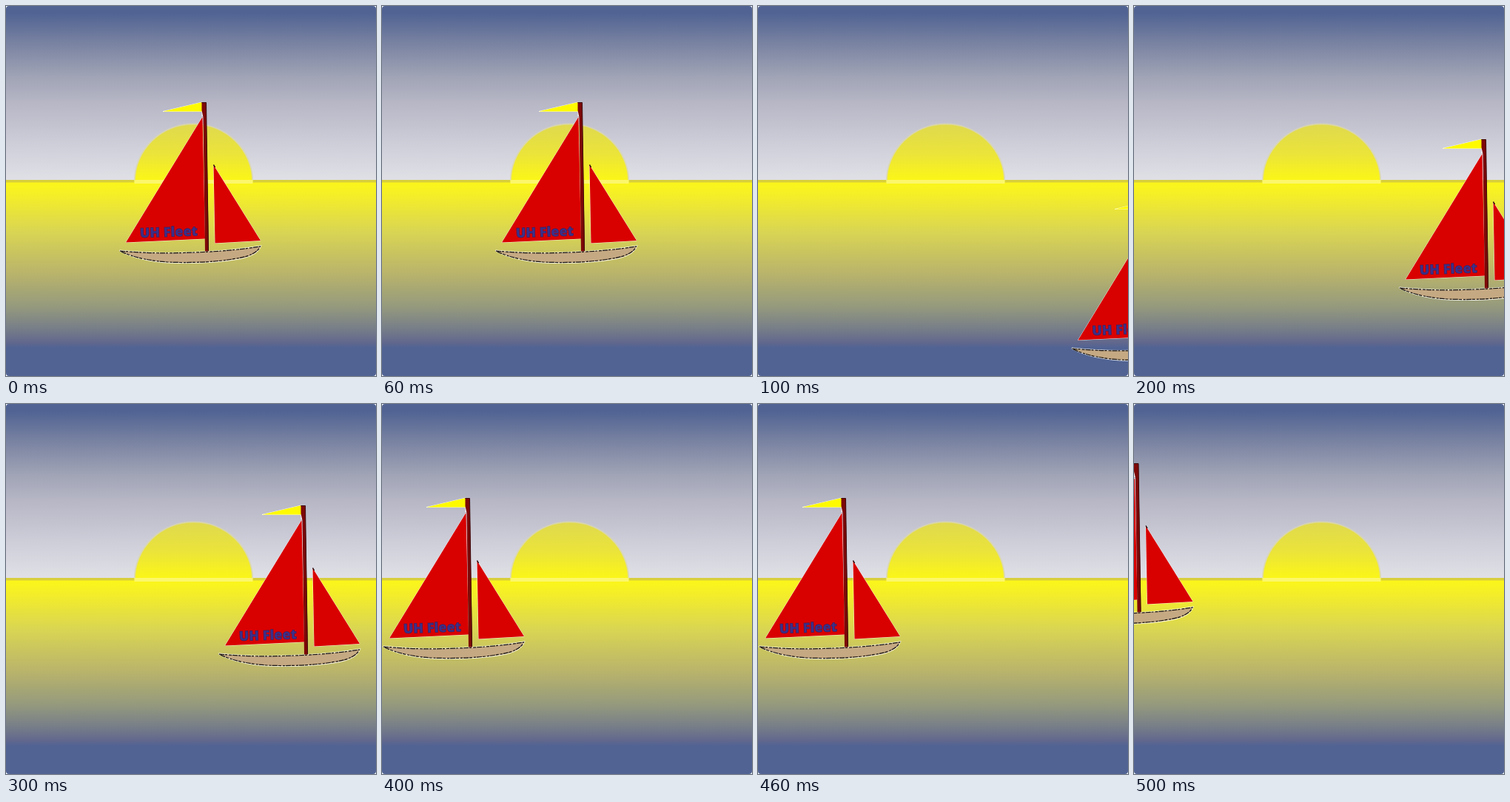
Write an HTML page that moves like this. It is 500x500 px and loops after 0.6 s.

```html
<!DOCTYPE html>
<html lang="en">
<head>
<meta charset="utf-8">
<title>Sailing boat at sunset</title>
<style>
  html, body { margin: 0; width: 100%; height: 100%; overflow: hidden; background: #fff; }
  svg { display: block; width: 100vw; height: 100vh; }
  text { font: 800 18px "Open Sans", sans-serif; fill: #3c2f8c; stroke: #3a2460; stroke-width: .7; }
  .cloth { stroke: #fff; stroke-opacity: .8; paint-order: stroke; }
</style>
</head>
<body>
<svg viewBox="0 0 500 500">
  <defs>
    <linearGradient id="sky" gradientUnits="userSpaceOnUse" x1="0" y1="0" x2="0" y2="236">
      <stop offset=".04" stop-color="#506393"/>
      <stop offset=".2" stop-color="#7680a0"/>
      <stop offset=".4" stop-color="#9fa3b5"/>
      <stop offset=".55" stop-color="#b6b6c5"/>
      <stop offset=".8" stop-color="#cfcfda"/>
      <stop offset="1" stop-color="#e0e0e6"/>
    </linearGradient>
    <linearGradient id="sea" gradientUnits="userSpaceOnUse" x1="0" y1="238" x2="0" y2="462">
      <stop offset="0" stop-color="#fcf61a"/>
      <stop offset=".1" stop-color="#f2ec2c"/>
      <stop offset=".3" stop-color="#d9d553"/>
      <stop offset=".55" stop-color="#b9b46b"/>
      <stop offset=".75" stop-color="#959a7d"/>
      <stop offset=".88" stop-color="#787f88"/>
      <stop offset=".97" stop-color="#61678d"/>
      <stop offset="1" stop-color="#506393"/>
    </linearGradient>
    <linearGradient id="sun" x1="0" y1="0" x2="0" y2="1">
      <stop offset="0" stop-color="#dfd94e"/>
      <stop offset=".5" stop-color="#ebe43a"/>
      <stop offset="1" stop-color="#fdf812"/>
    </linearGradient>
    <clipPath id="card"><rect width="500" height="500" rx="4"/></clipPath>
  </defs>

  <g clip-path="url(#card)">
    <rect width="500" height="236" fill="url(#sky)"/>
    <rect y="235" width="500" height="4" fill="#d8cf3c"/>
    <rect y="238.5" width="500" height="262" fill="url(#sea)"/>
    <path d="M173.500 240A80 80.500 0 0 1 333.500 240Z" fill="url(#sun)"/>
    <path d="M174 236A79.500 76.500 0 0 1 333 236" fill="none" stroke="#dcd9a8" stroke-width="2" opacity=".75"/>
    <rect x="173.500" y="235" width="160" height="5" fill="#fcf76a"/>

    <g id="boat">
      <g class="cloth">
        <path d="M265.500 150L269 314.500L162 319.500Z" fill="#d90000"/>
        <path d="M280.500 215L344 317L282.500 320.500Z" fill="#d90000"/>
        <path d="M212 142.500L265 130V142.500Z" fill="#fffa00"/>
        <path d="M265.500 143V149" stroke-width="2"/>
        <path d="M153.500 330.500Q198 335 240 333.500Q300 332 344 324.500Q339 338 312 342Q280 347.500 235 347Q184 346.500 153.500 330.500Z" fill="#c5a983" stroke-width="2"/>
      </g>
      <path d="M154 331Q198 335 240 333.500Q300 332 343.500 325Q338 337 312 341Q280 347 235 346.500Q184 346 154 331Z" fill="none" stroke="#17120e" stroke-width="1.200" stroke-dasharray="7 1 3 2 4 1"/>
      <path d="M264.500 130H270.500L274 331.500H269L266.500 150L264.500 141Z" fill="#7d0808"/>
      <path d="M264.500 130.500H270.500L273.500 331" fill="none" stroke="#3a0808"/>
      <path d="M280.500 214.500L282.500 218" stroke="#200" stroke-width="1.500"/>
      <text transform="translate(181 313) rotate(-2)">UH Fleet</text>
    </g>
  </g>
</svg>
<script>
  const boat = document.getElementById("boat");
  const HOLD = 100;
  // The boat jumps between these offsets and rests at each.
  const stops = [[0, 0], [270.5, 132], [205, 50], [134, 7], [-152, -3], [-264.5, -50]];
  const start = performance.now();

  function draw() {
    const step = Math.floor((performance.now() - start) / HOLD);
    const [x, y] = stops[step % stops.length];
    boat.setAttribute("transform", `translate(${x} ${y})`);
    requestAnimationFrame(draw);
  }

  draw();
</script>
</body>
</html>
```
